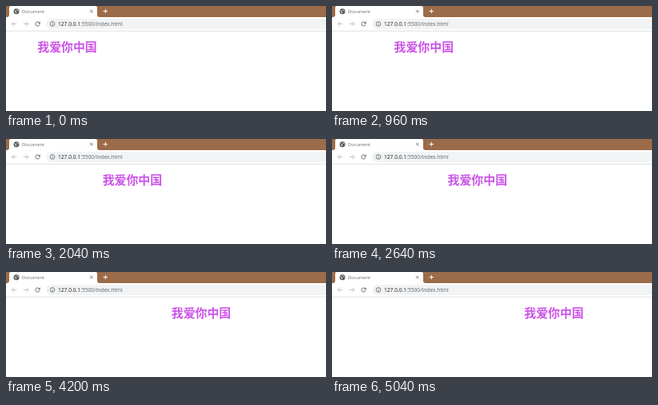
These frames come from a looping animation (400x132 px, 5.16 s). An HTML page with a canvas:

```html
<!DOCTYPE html>
<html lang="zh-CN">
<head>
<meta charset="utf-8">
<style>
  html, body { margin: 0; width: 100%; height: 100%; overflow: hidden; background: #fff; }
  canvas { display: block; }
</style>
</head>
<body>
<canvas id="stage" width="400" height="132"></canvas>
<script>
const ctx = document.getElementById('stage').getContext('2d');
const LOOP = 5160, STEP = 120, STEP_PX = 201 / 42;
const UI_FONT = '"Open Sans", "Noto Sans", sans-serif';
const ICON = '#5f6368', PALE = '#b9bbbe';

function text(str, x, y, font, color) {
  ctx.font = font;
  ctx.fillStyle = color;
  ctx.fillText(str, x, y);
}

function line(color, width, ...points) {
  ctx.strokeStyle = color;
  ctx.lineWidth = width;
  ctx.beginPath();
  points.forEach(([x, y]) => ctx.lineTo(x, y));
  ctx.stroke();
}

function arc(x, y, r, color, width, from = 0, to = Math.PI * 2) {
  ctx.strokeStyle = color;
  ctx.lineWidth = width;
  ctx.beginPath();
  ctx.arc(x, y, r, from, to);
  ctx.stroke();
}

function disc(x, y, r, color) {
  ctx.fillStyle = color;
  ctx.beginPath();
  ctx.arc(x, y, r, 0, Math.PI * 2);
  ctx.fill();
}

function drawTabs() {
  ctx.fillStyle = '#9c6b49';
  ctx.fillRect(0, 0, 400, 14);
  ctx.fillStyle = '#fff';
  ctx.beginPath();
  ctx.moveTo(1, 14);
  ctx.quadraticCurveTo(4, 14, 4, 11);
  ctx.lineTo(4, 2);
  ctx.quadraticCurveTo(4, 0, 6, 0);
  ctx.lineTo(112, 0);
  ctx.quadraticCurveTo(114, 0, 114, 2);
  ctx.lineTo(114, 11);
  ctx.quadraticCurveTo(114, 14, 117, 14);
  ctx.fill();

  // globe icon
  disc(13, 6.7, 3.5, '#55595e');
  line('#f4f4f4', 1, [10.5, 5.8], [12.6, 7], [12.2, 9]);
  line('#f4f4f4', 1, [13.2, 4.3], [14.3, 5.6], [15.6, 6]);

  text('Document', 20, 8.9, '5.75px ' + UI_FONT, '#66696d');
  line(ICON, 0.8, [105, 4.8], [108.6, 8.4]);
  line(ICON, 0.8, [108.6, 4.8], [105, 8.4]);
  line('#fff', 1, [121.5, 6.5], [127, 6.5]);
  line('#fff', 1, [124.3, 3.8], [124.3, 9.2]);
}

function drawToolbar() {
  ctx.fillStyle = '#fff';
  ctx.fillRect(0, 14, 400, 17);

  line(PALE, 0.9, [13.2, 22.5], [7.2, 22.5]);
  line(PALE, 0.9, [10, 19.7], [7.2, 22.5], [10, 25.3]);
  line(PALE, 0.9, [22, 22.5], [28, 22.5]);
  line(PALE, 0.9, [25.2, 19.7], [28, 22.5], [25.2, 25.3]);

  arc(39.5, 22.5, 2.6, ICON, 0.9, 0.3, 5.4);
  ctx.fillStyle = ICON;
  ctx.beginPath();
  ctx.moveTo(42.7, 19.2);
  ctx.lineTo(42.7, 22.2);
  ctx.lineTo(39.8, 22.2);
  ctx.fill();

  ctx.fillStyle = '#f1f3f4';
  ctx.beginPath();
  ctx.roundRect(50, 16, 370, 13, 6.5);
  ctx.fill();

  arc(58, 22.5, 2.9, ICON, 0.8);
  line(ICON, 0.8, [58, 22.1], [58, 24.2]);
  line(ICON, 0.8, [58, 20.7], [58, 21.4]);

  const font = '6.67px ' + UI_FONT, host = '127.0.0.1';
  text(host, 65, 25, font, '#202124');
  text(':5500/index.html', 65 + ctx.measureText(host).width, 25, font, '#5f6368');

  ctx.fillStyle = '#e2e3e5';
  ctx.fillRect(0, 31, 400, 1);
}

function draw(now) {
  const step = Math.floor((now % LOOP) / STEP);
  ctx.fillStyle = '#fff';
  ctx.fillRect(0, 0, 400, 132);
  drawTabs();
  drawToolbar();
  text('我爱你中国', 39.3 + step * STEP_PX, 57.2,
    'bold 14.9px "Noto Sans CJK SC", "Noto Sans CJK", sans-serif', '#cc55e8');
  requestAnimationFrame(draw);
}

draw(0);
</script>
</body>
</html>
```
